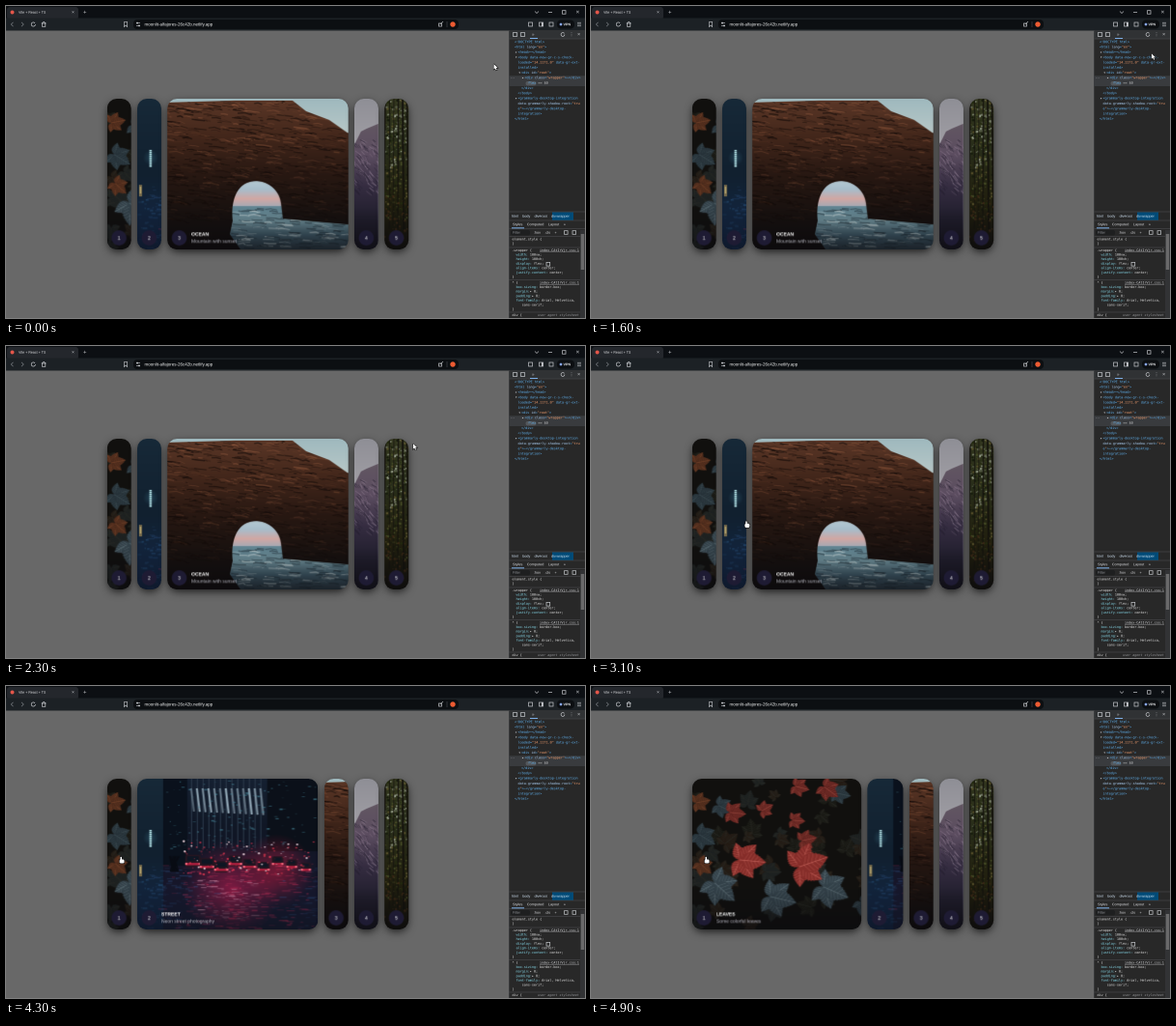
Recreate the animation shown at these times as an HTML page with a canvas. Size 600 by 323 pixels, loop 5000 ms.

```html
<!DOCTYPE html>
<html lang="en">
<head>
<meta charset="utf-8">
<title>Expanding cards</title>
<style>
html, body { margin: 0; width: 100%; height: 100%; overflow: hidden; background: #686868; }
canvas { display: block; width: 600px; height: 323px; }
</style>
</head>
<body>
<canvas id="stage"></canvas>
<script>
const W = 600, H = 323, LOOP = 5000, STEP = 100;
const SCALE = window.devicePixelRatio || 1;
const OVERSAMPLE = 4;
const SANS = '"Liberation Sans", Arial, sans-serif';
const MONO = '"DejaVu Sans Mono", "Liberation Mono", monospace';

// ---------- helpers ----------
function prepare(canvas, w, h, scale) {
  canvas.width = Math.round(w * scale);
  canvas.height = Math.round(h * scale);
  const g = canvas.getContext('2d');
  g.scale(scale, scale);
  g.textBaseline = 'middle';
  g.imageSmoothingQuality = 'high';
  return g;
}
// Painted large and reduced once, so that tiny text stays legible
function layer(w, h, paint) {
  const large = document.createElement('canvas'), small = document.createElement('canvas');
  paint(prepare(large, w, h, SCALE * OVERSAMPLE));
  prepare(small, w, h, SCALE).drawImage(large, 0, 0, w, h);
  return small;
}
function randomizer(seed) {
  return (min = 0, max = 1) => {
    seed = (seed * 16807) % 2147483647;
    return min + (max - min) * seed / 2147483647;
  };
}
function repeat(count, action) {
  for (let i = 0; i < count; i++) action(i);
}
function box(g, color, x, y, w, h, r = 0) {
  g.fillStyle = color;
  g.beginPath();
  g.roundRect(x, y, w, h, r);
  g.fill();
}
function disc(g, color, x, y, r) {
  g.fillStyle = color;
  g.beginPath();
  g.arc(x, y, r, 0, Math.PI * 2);
  g.fill();
}
function trace(g, points) {
  g.beginPath();
  for (let i = 0; i < points.length; i += 2) g.lineTo(points[i], points[i + 1]);
}
function poly(g, color, ...points) {
  trace(g, points);
  g.closePath();
  g.fillStyle = color;
  g.fill();
}
function line(g, color, width, ...points) {
  trace(g, points);
  g.strokeStyle = color;
  g.lineWidth = width;
  g.stroke();
}
function ring(g, color, x, y, r) {
  g.beginPath();
  g.arc(x, y, r, 0, Math.PI * 1.8);
  g.strokeStyle = color;
  g.lineWidth = .7;
  g.stroke();
}
function frame(g, color, x, y, size) {
  g.strokeStyle = color;
  g.lineWidth = .7;
  g.strokeRect(x, y, size, size);
}
function label(g, str, x, y, color, size, family = SANS, style = '') {
  g.font = `${style} ${size}px ${family}`;
  g.fillStyle = color;
  g.fillText(str, x, y);
  return x + g.measureText(str).width;
}
function labelRow(g, words, x, y, color, size, gap) {
  for (const word of words) x = label(g, word, x, y, color, size) + gap;
}
function gradient(g, y0, y1, ...colors) {
  const fill = g.createLinearGradient(0, y0, 0, y1);
  colors.forEach((c, i) => fill.addColorStop(i / (colors.length - 1), c));
  return fill;
}
function glow(g, rgb, alpha, x, y, r) {
  const fill = g.createRadialGradient(x, y, 0, x, y, r);
  fill.addColorStop(0, `rgba(${rgb},${alpha})`);
  fill.addColorStop(1, `rgba(${rgb},0)`);
  disc(g, fill, x, y, r);
}
function bezier(x1, y1, x2, y2) {
  const at = (a, b, s) => 3 * (1 - s) ** 2 * s * a + 3 * (1 - s) * s * s * b + s ** 3;
  return p => {
    if (p <= 0) return 0;
    if (p >= 1) return 1;
    let lo = 0, hi = 1;
    repeat(24, () => {
      const mid = (lo + hi) / 2;
      if (at(x1, x2, mid) < p) lo = mid; else hi = mid;
    });
    return at(y1, y2, lo);
  };
}

// ---------- card pictures ----------
const PW = 187.5, PH = 156.25;

function leaf(g, length, color, vein) {
  const rim = s => length * .36 * Math.sin(Math.PI * s ** .75);
  const outline = [];
  for (const side of [1, -1])
    repeat(21, i => {
      const s = side > 0 ? i / 20 : 1 - i / 20;
      outline.push(s * length, side * rim(s) * (i % 2 ? 1 : .82));
    });
  poly(g, color, ...outline);
  line(g, vein, .6, 0, 0, length * .95, 0);
  for (let s = .15; s < .8; s += .13)
    for (const side of [1, -1])
      line(g, vein, .3, s * length, 0, (s + .15) * length, side * rim(s + .12) * .8);
}
function sprig(g, x, y, size, turn, color, vein) {
  for (const spread of [-1.9, 1.9, -.85, .85, 0]) {
    g.save();
    g.translate(x, y);
    g.rotate(turn + spread);
    leaf(g, size * (1 - Math.abs(spread) * .17), color, vein);
    g.restore();
  }
}
function paintLeaves(g) {
  const rnd = randomizer(77);
  const scatter = (spots, size, color, vein) => {
    for (const [x, y] of spots) sprig(g, x, y, size * rnd(.85, 1.15), rnd(-.6, .8), color, vein);
  };
  box(g, '#11100e', 0, 0, PW, PH);
  repeat(45, i => sprig(g, rnd(0, PW), rnd(0, PH), rnd(9, 18), rnd(0, 6),
    ['#181813', '#1c2020', '#231a13'][i % 3], '#292a25'));
  scatter([[8, 58], [28, 28], [150, 15], [176, 128]], 17, '#263239', '#3d4c52');
  scatter([[5, 25], [9, 88]], 16, '#4b2a1b', '#704028');
  scatter([[24, 108], [82, 122], [137, 112]], 30, '#334149', '#62737a');
  scatter([[40, 35], [73, 33], [105, 43], [115, 64], [108, 8], [138, 9]], 15, '#61231f', '#93433a');
  scatter([[50, 84], [112, 91]], 28, '#852d29', '#c5635a');
}

function paintStreet(g) {
  const rnd = randomizer(211);
  box(g, gradient(g, 0, PH, '#152031', '#101725', '#161629', '#19203a'), 0, 0, PW, PH);
  box(g, gradient(g, 0, PH, '#172938', '#11202f', '#14294a'), 0, 0, 27, PH);
  box(g, '#0a111c', 27, 0, 25, 90);
  box(g, '#0b1019', 135, 0, 53, 75);
  for (let x = 56; x < 132; x += 6) {
    box(g, '#2b394a', x, 0, 1, 72);
    line(g, `rgba(178,202,216,${rnd(.4, .9)})`, 2, x, 10, x + 3, 34 + (x - 56) * .05);
  }
  repeat(140, () => box(g, `rgba(75,145,165,${rnd(.1, .6)})`, rnd(30, 185), rnd(2, 75), rnd(.7, 3.5), rnd(.5, 1.8)));

  // Wet road and its reflections
  glow(g, '215,30,85', .55, 98, 115, 50);
  glow(g, '230,30,70', .45, 145, 95, 38);
  repeat(420, () => {
    const x = rnd(10, PW), y = rnd(88, PH), red = rnd(45, 180) > Math.abs(x - 110) * 2;
    box(g, red ? `rgba(235,55,100,${rnd(.08, .5)})` : `rgba(55,100,160,${rnd(.08, .4)})`, x, y, rnd(2, 9), rnd(.4, 1.4));
  });
  repeat(90, () => box(g, `rgba(230,170,195,${rnd(.15, .65)})`, rnd(62, 122), rnd(103, 145), rnd(2, 9), rnd(.3, 1)));

  // Traffic grows smaller towards the right
  repeat(9, i => {
    const x = 50 + i * 15, size = 16 - i * .7, y = 85 + (i % 3) * 3;
    box(g, '#241520', x, y - size * .4, size, size * .8, 2);
    box(g, '#0e1623', x + 2, y - size * .3, size - 4, size * .3, 1);
    box(g, '#a91f3d', x, y + 2, size, 2.5, 1);
    for (const end of [1, size - 1]) disc(g, '#ff6e82', x + end, y + 3, 1.2);
  });
  repeat(150, i => disc(g, i % 4 ? `rgba(245,60,85,${rnd(.3, .95)})` : '#dec6cf', rnd(48, 186), rnd(64, 99), rnd(.3, 1.2)));
  repeat(12, () => line(g, '#090c14', 1.5, rnd(32, 44), 80, rnd(32, 44), 96));

  // Signs on the left
  glow(g, '90,180,210', .2, 14, 61, 8);
  for (let y = 53; y < 71; y += 2) box(g, '#a9d7dc', 12.7, y, 2.6, 1.5);
  box(g, '#74694b', 2, 89, 3.2, 12);
  box(g, '#b2a16d', 2.8, 91, 1.5, 7);
  repeat(50, () => box(g, `rgba(42,85,130,${rnd(.1, .5)})`, rnd(0, 27), rnd(98, 150), rnd(1, 5), rnd(.5, 2)));
}

function paintOcean(g) {
  const rnd = randomizer(35);
  box(g, gradient(g, 0, 50, '#9fb9be', '#c0cdcb'), 0, 0, PW, PH);
  g.save();
  trace(g, [0, 4, 70, 2, 130, 2, 144, 13, 168, 22, 188, 36, 188, 157, 0, 157]);
  g.clip();
  box(g, gradient(g, 0, PH, '#5b3727', '#43271b', '#281812', '#18110f', '#100d0d'), 0, 0, PW, PH);
  repeat(900, i => {
    const x = rnd(-10, PW), y = rnd(2, 130), w = rnd(2, 17);
    const color = i % 5 < 3 ? `rgba(17,10,8,${rnd(.15, .65)})` : `rgba(160,98,67,${rnd(.06, .5) * (1 - y / 150)})`;
    line(g, color, rnd(.4, 1.6), x, y, x + w / 2, y + rnd(-1, 1), x + w, y + w * .12);
  });
  g.restore();

  // Opening in the rock, widening to the shore
  g.save();
  g.beginPath();
  g.moveTo(68, 126);
  g.bezierCurveTo(66, 110, 70, 92, 83, 87);
  g.bezierCurveTo(98, 81, 116, 91, 118, 108);
  g.lineTo(120, 124);
  g.lineTo(188, 130);
  g.lineTo(188, 157);
  g.lineTo(77, 157);
  g.lineTo(65, 140);
  g.clip();
  box(g, gradient(g, 84, 113, '#b5cbd4', '#a7bdca', '#d1a7a3', '#9caab6'), 0, 80, PW, 33);
  box(g, gradient(g, 111, PH, '#5f8290', '#6e8f99', '#405b69', '#2c3a43'), 0, 111, PW, 46);
  repeat(170, i => {
    const x = rnd(63, 185), y = rnd(113, 154);
    line(g, i % 2 ? `rgba(210,224,225,${rnd(.1, .7)})` : 'rgba(25,37,44,.5)', rnd(.4, 1.4),
      x, y, x + rnd(2, 7), y + rnd(-1, 1), x + rnd(7, 14), y + .7);
  });
  g.restore();
}

function paintMountain(g) {
  const rnd = randomizer(9);
  box(g, gradient(g, 0, 50, '#8f8f96', '#a19fa5'), 0, 0, PW, PH);
  poly(g, gradient(g, 25, PH, '#625762', '#5c4d60', '#352d41', '#211e2d', '#171620'),
    0, 48, 7, 34, 13, 31, 25, 26, 25, PH, 0, PH);
  repeat(110, i => {
    const x = rnd(-3, 25), y = rnd(42, 96);
    line(g, i % 2 ? 'rgba(178,160,178,.3)' : 'rgba(38,31,48,.5)', rnd(.4, 1.2), x, y, x + rnd(2, 6), y + rnd(2, 6));
  });
}

function paintForest(g) {
  const rnd = randomizer(58);
  box(g, gradient(g, 0, PH, '#33371f', '#292e1a', '#22200f', '#14120c'), 0, 0, PW, PH);
  repeat(85, () => disc(g, `rgba(192,200,180,${rnd(.2, .8)})`, rnd(0, 25), rnd(0, 75), rnd(.3, 1.5)));
  repeat(320, i => disc(g, ['#454c25', '#22290f', '#57502a', '#151b0c'][i % 4], rnd(0, 25), rnd(0, 125), rnd(.3, 1.3)));
  repeat(6, i => line(g, '#14120d', rnd(.7, 1.9), 1 + i * 4.5, 0, i * 4.5 + rnd(-1, 3), 135));
  repeat(80, i => disc(g, i % 2 ? '#3a2815' : '#19190f', rnd(0, 25), rnd(100, 150), rnd(.4, 1.4)));
}

function paintCard(g, paint, number) {
  paint(g);
  box(g, gradient(g, 112, PH, 'rgba(10,10,14,0)', 'rgba(10,10,14,.5)'), 0, 112, PW, 45);
  disc(g, '#1e1b33', 12.5, 143.8, 7.8);
  g.textAlign = 'center';
  label(g, number, 12.5, 144, '#fff', 5);
}
function paintCaption(g, title, note) {
  label(g, title, 0, 5, '#fff', 5, SANS, 'bold');
  label(g, note, 0, 12.3, '#b0b0ba', 5);
}
const cards = [
  [paintLeaves, 'LEAVES', 'Some colorful leaves'],
  [paintStreet, 'STREET', 'Neon street photography'],
  [paintOcean, 'OCEAN', 'Mountain with sunset'],
  [paintMountain, '', ''],
  [paintForest, '', '']
].map(([paint, title, note], i) => ({
  picture: layer(PW, PH, g => paintCard(g, paint, i + 1)),
  caption: layer(80, 18, g => paintCaption(g, title, note))
}));

// ---------- browser window and inspector ----------
const INK = '#c6c8cc';

function paintBrowser(g) {
  box(g, '#0c0f13', 0, 0, W, 13);
  box(g, '#24272c', 1, 1, 74, 13, 3);
  box(g, '#1c2125', 0, 12.5, W, 13);
  disc(g, '#e4564a', 6.5, 6.5, 2);
  label(g, 'Vite + React + TS', 13, 6.8, '#e6e7ea', 3.6);
  label(g, '×', 68, 6.5, INK, 5);
  label(g, '+', 80, 6.5, INK, 6);
  line(g, INK, .6, 548, 5.5, 550, 7.5, 552, 5.5);
  line(g, INK, .7, 562, 6.5, 566, 6.5);
  frame(g, INK, 576.5, 4.7, 3.5);
  label(g, '×', 590.5, 6.5, INK, 6.5);

  line(g, '#777b80', .7, 7.5, 16.8, 5.3, 19, 7.5, 21.2);
  line(g, '#777b80', .7, 16, 16.8, 18.2, 19, 16, 21.2);
  ring(g, INK, 28.3, 19, 2.1);
  frame(g, INK, 37.5, 18, 3.3);
  line(g, INK, .7, 36.8, 18.2, 39.2, 16.3, 41.5, 18.2);
  line(g, INK, .6, 122.3, 16.5, 125.7, 16.5, 125.7, 21.5, 124, 20, 122.3, 21.5, 122.3, 16.5);
  box(g, '#0c0f12', 132, 14, 337, 10, 4);
  for (const side of [-1, 1]) {
    line(g, INK, .6, 135, 19 + side * 1.4, 139, 19 + side * 1.4);
    disc(g, INK, 137 + side, 19 + side * 1.4, .9);
  }
  label(g, 'moonlit-alfajores-26c42b.netlify.app', 143.5, 19.2, '#eceded', 4.5);
  frame(g, INK, 448.5, 18, 3);
  line(g, INK, .6, 450, 19, 453, 16);
  line(g, '#555860', .5, 457, 16, 457, 22);
  disc(g, '#ed5b32', 463, 19, 2.7);
  for (const x of [541.5, 552.5, 563]) frame(g, INK, x, 17, 4);
  box(g, INK, 555, 17, 1.5, 4);
  box(g, '#0c0f12', 571, 14.5, 18, 9, 4);
  disc(g, '#88a6ed', 575, 19, 1.4);
  label(g, 'VPN', 577.5, 19.2, '#e8e9eb', 3.7, SANS, 'bold');
  for (const dy of [-1.8, 0, 1.8]) line(g, INK, .6, 592, 19 + dy, 596, 19 + dy);
}

const MARKUP = `<!DOCTYPE html>
<html lang="en">
 ▸<head>⋯</head>
 ▾<body data-new-gr-c-s-check-
 loaded="14.1171.0" data-gr-ext-
 installed>
  ▾<div id="root">
   ▸<div class="wrapper">⋯</div>
    flex == $0
  </div>
 </body>
 ▸<grammarly-desktop-integration
 data-grammarly-shadow-root="tru
 e">⋯</grammarly-desktop-
 integration>
</html>`;

const STYLES = [
  [241.5, 'element.style {\n}'],
  [253, '.wrapper {\n  width: 100vw;\n  height: 100vh;\n  display: flex;\n  align-items: center;\n  justify-content: center;\n}'],
  [286.5, '* {\n  box-sizing: border-box;\n  margin:▸ 0;\n  padding:▸ 0;\n  font-family: Arial, Helvetica,\n     sans-serif;\n}'],
  [320, 'div {']
];

function tokenColor(token) {
  if (token[0] === '"') return '#f5a070';
  if (token.startsWith('==')) return '#d0d0d0';
  return /^(lang|id|class|data)/.test(token) ? '#a9cbee' : '#62b4f2';
}
function paintMarkup(g) {
  box(g, '#393b3e', 521, 72.2, 79, 10.8);
  label(g, '…', 523, 74, INK, 4);
  box(g, '#54575b', 538.5, 78, 11, 4.4, 2);
  MARKUP.split('\n').forEach((text, row) => {
    const [, indent, arrow, code] = text.match(/^( *)([▸▾]?)(.*)/);
    const y = 37.3 + row * 5.31;
    let x = 527 + indent.length * 3.5;
    label(g, arrow, x - 3, y, INK, 4, MONO);
    for (const token of code.split(/("[\w.-]*"?|[\w-]+(?==)|== \$0)/))
      if (token) x = label(g, token, x, y, tokenColor(token), 3.45, MONO);
  });
}
function paintStyles(g) {
  for (const [top, text] of STYLES) {
    text.split('\n').forEach((str, row) => {
      const cut = str.indexOf(':') + 1, y = top + row * 4.62;
      const x = label(g, str.slice(0, cut), 524.5, y, '#8adff0', 3.4, MONO);
      label(g, str.slice(cut), x, y, '#e8e8e8', 3.4, MONO);
    });
    if (top > 250) line(g, '#48494b', .6, 521, top - 3, 595, top - 3);
    if (text.includes(':')) {
      label(g, 'index-CAtIrVjr.css:1', 553, top, '#dcdde0', 3.4, MONO);
      line(g, '#b0b1b4', .4, 553, top + 1.8, 594, top + 1.8);
    }
  }
  label(g, 'user agent stylesheet', 551, 320, '#929396', 3.4, MONO, 'italic');
  frame(g, INK, 560, 265.4, 3.7);
}
function paintInspector(g) {
  box(g, '#282828', 521, 25, 79, 298);
  box(g, '#303234', 521, 25, 79, 9);
  box(g, '#004a77', 566, 213.5, 22, 8.5);
  for (const y of [34, 213, 222, 230.5, 238.5]) line(g, '#48494b', .6, 521, y, W, y);
  line(g, '#3f4042', .7, 521.4, 25, 521.4, H);
  for (const x of [525.5, 533.5]) frame(g, INK, x, 27.5, 4);
  label(g, '»', 545, 29.5, INK, 4.5);
  box(g, '#7caee6', 543, 33, 8, 1);
  ring(g, INK, 577, 29.5, 1.9);
  label(g, '⋮', 583.5, 29.5, INK, 5, MONO);
  label(g, '×', 592, 29.5, INK, 5.5);
  paintMarkup(g);

  labelRow(g, ['html', 'body', 'div#root', 'div.wrapper'], 524, 217.8, '#cfe0f0', 3.7, 4.3);
  labelRow(g, ['Styles', 'Computed', 'Layout', '»'], 525, 226.3, '#dcdde0', 3.8, 4.5);
  box(g, '#7caee6', 524, 229.3, 13, 1);
  box(g, '#1e1f20', 523, 232, 20, 5.5, 2);
  label(g, 'Filter', 525, 234.8, '#929498', 3.5);
  labelRow(g, [':hov', '.cls', '+'], 547, 234.8, '#dcdde0', 3.7, 4.5);
  for (const x of [578.5, 587]) frame(g, INK, x, 232.7, 3.6);
  paintStyles(g);
  box(g, '#323335', 595, 232, 5, 91);
  box(g, '#69696a', 595.7, 236, 3.5, 37);
}
const chrome = layer(W, H, g => {
  paintBrowser(g);
  paintInspector(g);
});
const tooltip = layer(39, 9, g => {
  box(g, '#fff', 0, 0, 39, 9, 1);
  label(g, 'body', 3, 4.7, '#24449b', 4, SANS, 'bold');
  label(g, '1669 × 951', 16, 4.7, '#555', 4);
});

// ---------- motion ----------
const CARD_TOP = 96, ROW_LEFT = 104.7, NARROW = 25, GAP = 6.25;
const FIRST_CLICK = 3700, SECOND_CLICK = 4534;
const expand = bezier(.28, -.03, 0, .99);
const ease = bezier(.25, .1, .25, 1);
const glide = bezier(.4, 0, .6, 1);
const moves = [
  { from: 500, to: 1000, x: 579, y: 43.5 },
  { from: 1200, to: 1800, x: 581.5, y: 51 },
  { from: 2000, to: 2700, x: 164, y: 182 },
  { from: 2900, to: 3300, x: 155.5, y: 180.5 },
  { from: 4100, to: 4300, x: 118, y: 176.8 }
];

function pointerAt(t) {
  let x = 505.5, y = 60;
  for (const move of moves) {
    const p = glide((t - move.from) / (move.to - move.from));
    x += (move.x - x) * p;
    y += (move.y - y) * p;
  }
  return [x, y];
}
function openness(t, curve, duration) {
  const first = curve((t - FIRST_CLICK) / duration), second = curve((t - SECOND_CLICK) / duration);
  return [second, first - second, 1 - first, 0, 0];
}

const g = prepare(document.getElementById('stage'), W, H, SCALE);

function drawCard(card, x, width, shown) {
  g.save();
  g.shadowColor = 'rgba(0,0,0,.8)';
  g.shadowBlur = 9.4 * SCALE;
  g.shadowOffsetY = 3.1 * SCALE;
  box(g, '#181818', x + 1.5, CARD_TOP + 1.5, width - 3, PH - 3, 9);
  g.restore();

  g.save();
  g.beginPath();
  g.roundRect(x, CARD_TOP, width, PH, 10);
  g.clip();
  g.drawImage(card.picture, x, CARD_TOP, PW, PH);
  g.globalAlpha = shown;
  g.drawImage(card.caption, x + 25, 231.4 + (1 - shown) * 9.4, 80, 18);
  g.restore();
}
function drawArrow() {
  const outline = [0, 0, 0, 5.6, 1.3, 4.4, 2.3, 6.5, 3.2, 6.1, 2.3, 4.1, 4, 4, 0, 0];
  line(g, '#111', 1.1, ...outline);
  poly(g, '#fff', ...outline);
}
function drawHand() {
  for (const [color, grow] of [['#111', .5], ['#fff', 0]]) {
    box(g, color, .5 - grow, -grow, 1.5 + grow * 2, 5 + grow * 2, .8);
    box(g, color, -.3 - grow, 2.6 - grow, 4.8 + grow * 2, 4.2 + grow * 2, 1.4);
  }
}
function drawPointer(x, y) {
  g.save();
  g.translate(x, y);
  if (x < 418 && y > CARD_TOP) drawHand(); else drawArrow();
  g.restore();
}
function draw(t) {
  box(g, '#686868', 0, 0, W, H);
  const widths = openness(t, expand, 600), captions = openness(t, ease, 300);
  let x = ROW_LEFT;
  cards.forEach((card, i) => {
    const width = NARROW + (PW - NARROW) * widths[i];
    drawCard(card, x, width, captions[i]);
    x += width + GAP;
  });
  if (t >= 1800 && t < 2200) {
    box(g, 'rgba(111,168,220,.66)', 0, 25, 521, 298);
    g.drawImage(tooltip, 0, 314, 39, 9);
  }
  g.drawImage(chrome, 0, 0, W, H);
  drawPointer(...pointerAt(t));
}
function tick() {
  const t = performance.now() % LOOP;
  draw(Math.floor(t / STEP) * STEP);
  requestAnimationFrame(tick);
}
tick();
</script>
</body>
</html>
```
